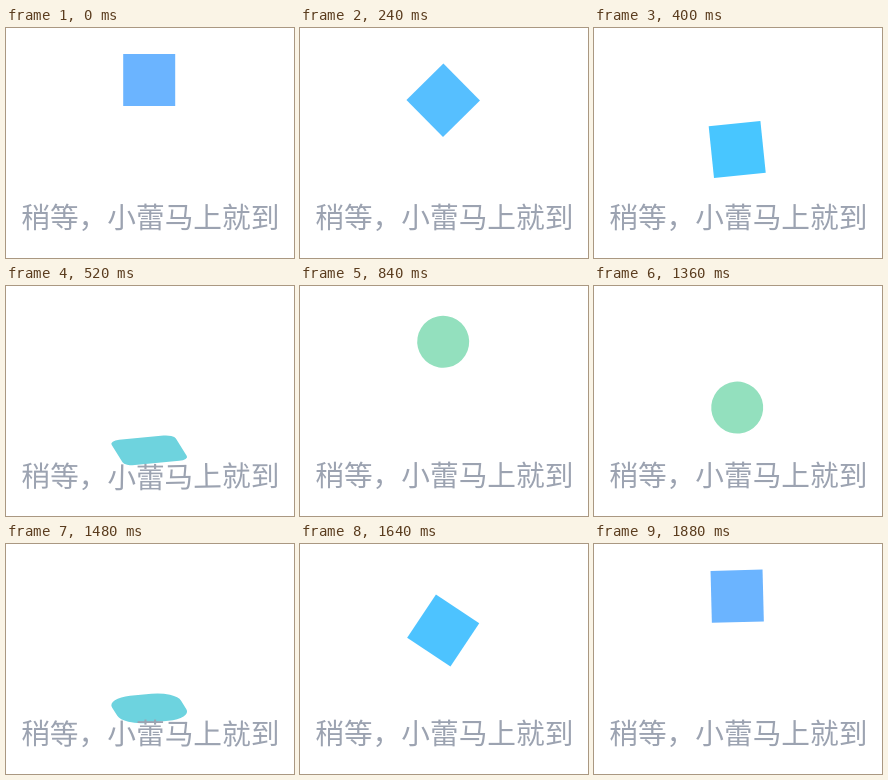
Write an HTML page that moves like this. It is 288x230 px and loops after 1.92 s.

```html
<!DOCTYPE html>
<html lang="zh-CN">
<head>
<meta charset="utf-8">
<style>
  html, body { margin: 0; width: 100%; height: 100%; overflow: hidden; background: #fff; }
  svg { display: block; width: 100vw; height: 100vh; }
  text { font: 400 28.7px "Noto Sans CJK SC", "Noto Sans CJK", sans-serif; fill: #9ca3b1; }
</style>
</head>
<body>
<svg viewBox="0 0 288 230">
  <rect id="shape" x="-26" y="-26" width="52" height="52"/>
  <text id="label" x="15.2" y="200.4">稍等，小蕾马上就到</text>
</svg>
<script>
const LOOP = 1920, HALF = 960;
const CENTER_X = 143.2, TOP = 52, DROP = 113, LAND = 490, LEAVE = 520;
const RADIUS = 26, SQUASH_X = 38, SQUASH_Y = 14.7, SQUASH_TILT = -14;
const TEXT_X = 15.2, PITCH = 28.7, DIP_WIDTH = 60;
const BLUE = [107, 180, 255], CYAN = [72, 198, 255], GREEN = [147, 224, 190];

const shape = document.getElementById('shape');
const label = document.getElementById('label');
const glyphs = [...label.textContent];

const ramp = (t, from, to) => Math.min(1, Math.max(0, (t - from) / (to - from)));
const mix = (a, b, k) => a + (b - a) * k;
const mixColor = (a, b, k) => a.map((v, i) => mix(v, b[i], k));

function height(p) {
  const fall = ramp(p, 0, LAND) ** 2.42;
  const rise = ramp(p, HALF, LEAVE) ** 2.6;
  return TOP + DROP * Math.min(fall, rise);
}

// A quarter turn each way, folded to the nearest equivalent angle.
function angle(p) {
  const turn = 45 * (1 - Math.cos(Math.PI * p / 480));
  const signed = p < 480 ? turn : -turn;
  return signed - 90 * Math.round(signed / 90);
}

function color(t) {
  const cyan = ramp(t, 0, 400) - ramp(t, 1600, 1880);
  const green = ramp(t, 400, 640) - ramp(t, 1360, 1600);
  return mixColor(mixColor(BLUE, CYAN, cyan), GREEN, green);
}

function drawShape(t, p) {
  const round = ramp(t, 490, 590) - ramp(t, HALF + 490, HALF + 590);
  const squash = ramp(p, 440, 495) - ramp(p, LEAVE, 600);
  const turn = mix(angle(p), SQUASH_TILT, squash);
  const corner = RADIUS * round;
  const a = turn * Math.PI / 180;
  const extent = (RADIUS - corner) * (Math.abs(Math.cos(a)) + Math.abs(Math.sin(a))) + corner;
  const sx = mix(1, SQUASH_X / extent, squash);
  const sy = mix(1, SQUASH_Y / extent, squash);
  shape.setAttribute('rx', corner);
  shape.setAttribute('transform',
    `translate(${CENTER_X} ${height(p)}) scale(${sx} ${sy}) rotate(${turn})`);
  shape.setAttribute('fill', `rgb(${color(t).map(Math.round)})`);
}

// The line of text sags under the impact and springs back.
function drawLabel(p, swing) {
  const q = ramp(p, 440, 600);
  const dip = 11 * Math.sin(Math.PI * q / swing) * (1 - q) ** 2;
  let previous = 0;
  const shifts = [], tilts = [];
  glyphs.forEach((_, i) => {
    const offset = (TEXT_X + PITCH * (i + 0.5) - CENTER_X) / DIP_WIDTH;
    const y = dip * Math.exp(-offset * offset);
    const slope = -2 * offset * y / DIP_WIDTH;
    shifts.push((y - previous).toFixed(3));
    tilts.push((Math.atan(slope) * 180 / Math.PI).toFixed(2));
    previous = y;
  });
  label.setAttribute('dy', shifts.join(' '));
  label.setAttribute('rotate', tilts.join(' '));
}

function render(t) {
  const p = t % HALF;
  drawShape(t, p);
  drawLabel(p, t < HALF ? 0.65 : 0.5);
}

const start = performance.now();
function tick() {
  render((performance.now() - start) % LOOP);
  requestAnimationFrame(tick);
}
render(0);
requestAnimationFrame(tick);
</script>
</body>
</html>
```
